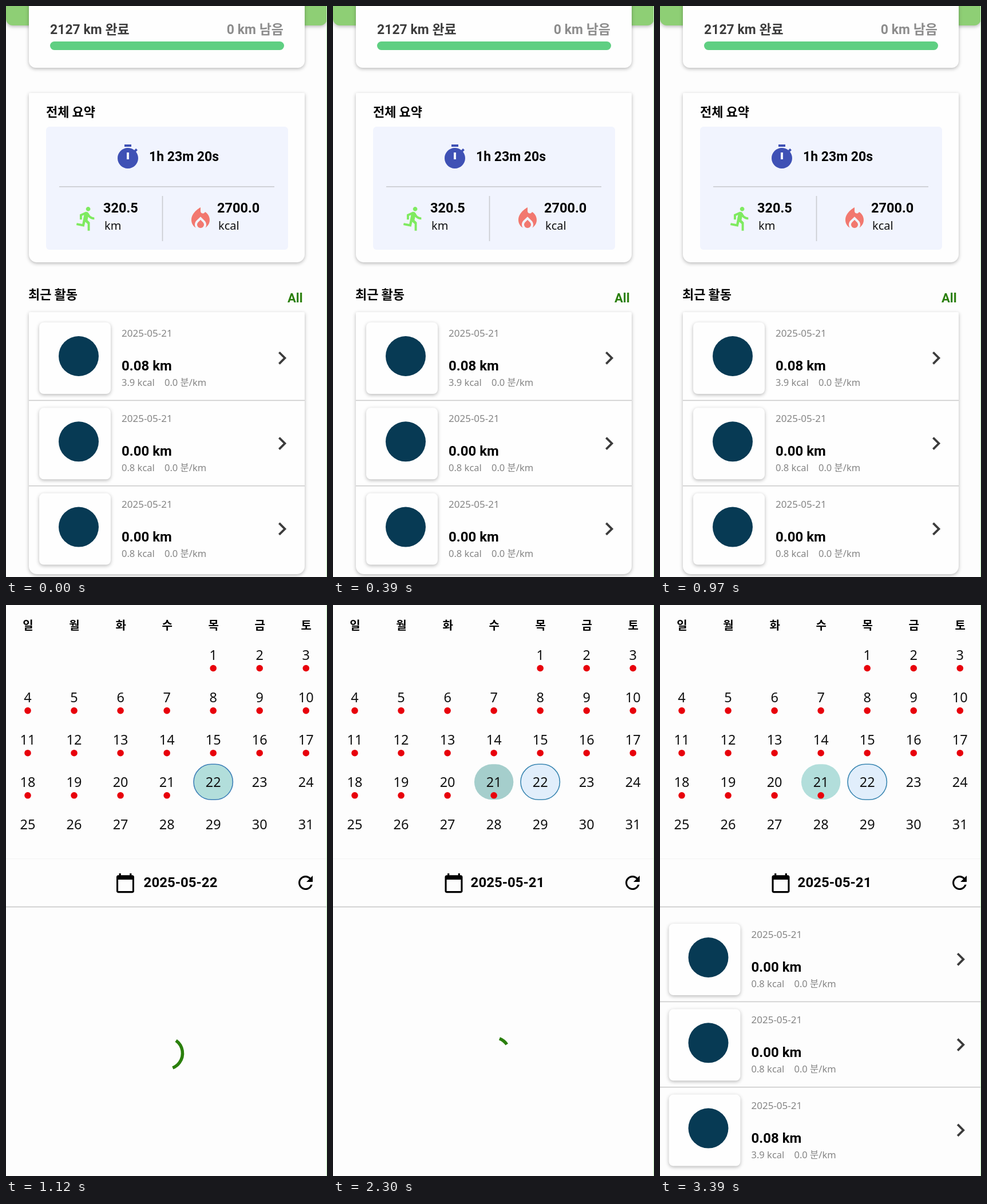
Recreate the animation shown at these times as an HTML page with a canvas. Size 561x998 px, loop 3420 ms.

```html
<!DOCTYPE html>
<html lang="ko">
<head>
<meta charset="utf-8">
<style>
html, body { margin: 0; width: 100%; height: 100%; overflow: hidden; background: #fdfdfd; }
canvas { display: block; }
</style>
</head>
<body>
<canvas id="stage" width="561" height="998"></canvas>
<script>
const ctx = document.getElementById('stage').getContext('2d');
const LOOP = 3420;
const BOLD = 'Roboto, "Noto Sans CJK KR", sans-serif';
const PLAIN = '"Noto Sans", "Noto Sans CJK KR", sans-serif';
const HANGUL = '"Noto Sans CJK KR", sans-serif';
const GREEN = '#2a7f0c';

// Times in ms
const OPEN_CALENDAR = 1000, EMPTY_SHOWN = 1480, DAY_TAPPED = 2170, LIST_SHOWN = 2600;

const icons = {
  timer: 'M15 1H9v2h6V1zm-4 13h2V8h-2v6zm8.03-6.61l1.42-1.42c-.43-.51-.9-.99-1.41-1.41l-1.42 1.42C16.07 4.74 14.12 4 12 4c-4.97 0-9 4.03-9 9s4.02 9 9 9 9-4.03 9-9c0-2.12-.74-4.07-1.97-5.61z',
  run: 'M13.49 5.48c1.1 0 2-.9 2-2s-.9-2-2-2-2 .9-2 2 .9 2 2 2zm-3.6 13.9l1-4.4 2.1 2v6h2v-7.5l-2.1-2 .6-3c1.3 1.5 3.3 2.5 5.5 2.5v-2c-1.9 0-3.5-1-4.3-2.4l-1-1.6c-.4-.6-1-1-1.7-1-.3 0-.5.1-.8.1l-5.2 2.2v4.7h2v-3.4l1.8-.7-1.6 8.1-4.9-1-.4 2 7 1.4z',
  fire: 'M12 12.9l-2.13 2.09C9.31 15.55 9 16.28 9 17.06 9 18.68 10.35 20 12 20s3-1.32 3-2.94c0-.78-.31-1.52-.87-2.07zM16 6l-.44.55C14.38 8.02 12 7.19 12 5.3V2S4 6 4 13c0 2.92 1.56 5.47 3.89 6.86-.56-.79-.89-1.76-.89-2.8 0-1.32.52-2.56 1.47-3.5L12 10.1l3.53 3.47c.95.93 1.47 2.17 1.47 3.5 0 1.02-.31 1.96-.85 2.75 1.89-1.15 3.29-3.06 3.71-5.3.66-3.55-1.07-6.9-3.86-8.52z',
  calendar: 'M20 3h-1V1h-2v2H7V1H5v2H4c-1.1 0-2 .9-2 2v16c0 1.1.9 2 2 2h16c1.1 0 2-.9 2-2V5c0-1.1-.9-2-2-2zm0 18H4V8h16v13z',
  refresh: 'M17.65 6.35C16.2 4.9 14.21 4 12 4c-4.42 0-7.99 3.58-7.99 8s3.57 8 7.99 8c3.73 0 6.84-2.55 7.73-6h-2.08c-.82 2.33-3.04 4-5.65 4-3.31 0-6-2.69-6-6s2.69-6 6-6c1.66 0 3.14.69 4.22 1.78L13 11h7V4l-2.35 2.35z',
  info: 'M12 2C6.48 2 2 6.48 2 12s4.48 10 10 10 10-4.48 10-10S17.52 2 12 2zm1 15h-2v-6h2v6zm0-8h-2V7h2v2z',
  chevron: 'M10 6L8.59 7.41 13.17 12l-4.58 4.59L10 18l6-6z'
};
for (const name in icons) icons[name] = new Path2D(icons[name]);

function icon(name, x, y, scale, color) {
  ctx.save();
  ctx.translate(x, y);
  ctx.scale(scale, scale);
  ctx.fillStyle = color;
  ctx.fill(icons[name], 'evenodd');
  ctx.restore();
}

function text(str, x, y, font, color = '#000', align = 'left') {
  ctx.font = font;
  ctx.fillStyle = color;
  ctx.textAlign = align;
  ctx.fillText(str, x, y);
}

function rect(x, y, w, h, color) {
  ctx.fillStyle = color;
  ctx.fillRect(x, y, w, h);
}

function rounded(x, y, w, h, radius, color) {
  ctx.beginPath();
  ctx.roundRect(x, y, w, h, radius);
  ctx.fillStyle = color;
  ctx.fill();
}

function disc(x, y, r, color) {
  ctx.beginPath();
  ctx.arc(x, y, r, 0, Math.PI * 2);
  ctx.fillStyle = color;
  ctx.fill();
}

function raised(x, y, w, h, radius, color = '#fefefe') {
  ctx.save();
  ctx.shadowColor = 'rgba(0,0,0,.28)';
  ctx.shadowBlur = 6;
  ctx.shadowOffsetY = 2;
  rounded(x, y, w, h, radius, color);
  ctx.restore();
}

function activity(thumbX, y, chevronX, km, kcal) {
  raised(thumbX, y, 125, 125, 8);
  disc(thumbX + 69, y + 59, 35, '#073a54');
  const x = thumbX + 144;
  text('2025-05-21', x, y + 25, '17px ' + PLAIN, '#858585');
  text(km + ' km', x, y + 84, 'bold 24px ' + BOLD);
  text(kcal + ' kcal', x, y + 111, '16.5px ' + PLAIN, '#858585');
  text('0.0 분/km', x + 75, y + 111, '16.5px ' + PLAIN, '#858585');
  icon('chevron', chevronX, y + 39.5, 1.9, '#3c3c3c');
}

function activityList(entries, thumbX, top, chevronX, lineX, lineW) {
  entries.forEach(([km, kcal], i) => {
    const y = top + i * 149.3;
    if (i) rect(lineX, y - 13.7, lineW, 1.6, '#cbcbcb');
    activity(thumbX, y, chevronX, km, kcal);
  });
}

function drawSummary() {
  raised(0, -30, 561, 64, 12, '#8ecf75');
  raised(40, -30, 482, 138, 12);
  text('2127 km 완료', 77, 49, 'bold 23px ' + BOLD, '#3c3c3c');
  text('0 km 남음', 485, 49, 'bold 23px ' + BOLD, '#8c8c8c', 'right');
  rounded(77, 62, 409, 15, 7.5, '#5fcf82');

  raised(40, 152, 482, 296, [2, 2, 14, 14]);
  text('전체 요약', 70, 193, 'bold 22px ' + HANGUL);
  rounded(70, 211, 423, 215, 6, '#f1f4fe');
  icon('timer', 189, 240, 2, '#3f51b5');
  text('1h 23m 20s', 250, 271, 'bold 23px ' + BOLD);
  rect(93, 315, 376, 1.6, '#c9cbd0');
  rect(272.7, 332, 1.6, 79, '#c9cbd0');
  icon('run', 117.3, 348, 1.95, '#7fea60');
  text('320.5', 170, 361, 'bold 23.5px ' + BOLD);
  text('km', 172, 391, '20px ' + PLAIN, '#111');
  icon('fire', 316, 348, 2, '#f2786f');
  text('2700.0', 369, 361, 'bold 23.5px ' + BOLD);
  text('kcal', 371, 391, '20px ' + PLAIN, '#111');

  text('최근 활동', 39, 512, 'bold 22px ' + HANGUL);
  text('All', 518.5, 518, 'bold 22px ' + BOLD, GREEN, 'right');
  raised(40, 535, 482, 458, [2, 2, 14, 14]);
  activityList([['0.08', '3.9'], ['0.00', '0.8'], ['0.00', '0.8']], 58, 553, 459.7, 40, 482);
}

const dayX = col => 38 + 81.05 * col;
const dayY = row => 87 + 74.1 * row;

function dayMark(col, fill, stroke) {
  rounded(dayX(col) - 34.2, dayY(3) - 31, 68.4, 62, 31, fill);
  if (!stroke) return;
  ctx.strokeStyle = stroke;
  ctx.lineWidth = 1.6;
  ctx.stroke();
}

function drawMonth(t) {
  if (t < DAY_TAPPED) {
    dayMark(4, '#b2dedb', '#3f80b8');
  } else {
    const press = Math.max(0, Math.min(1, (2500 - t) / 200));
    dayMark(3, '#b2dedb');
    dayMark(3, `rgba(0,0,0,${0.07 * press})`);
    dayMark(4, '#e1eefb', '#3b87b2');
  }
  [...'일월화수목금토'].forEach((name, col) =>
    text(name, dayX(col) + 0.5, 43, 'bold 20px ' + HANGUL, '#000', 'center'));
  for (let day = 1; day <= 31; day++) {
    const col = (day + 3) % 7, row = Math.floor((day + 3) / 7);
    text(day, dayX(col), dayY(row) + 9, '23.5px ' + PLAIN, '#111', 'center');
    if (day < 22) disc(dayX(col), dayY(row) + 23.5, 5.8, '#e8000b');
  }
}

// Cubic ease that fills the arc during the first half of its period
function arcGrowth(p) {
  if (p >= 0.5) return 1;
  let lo = 0, hi = 1;
  for (let i = 0; i < 20; i++) {
    const s = (lo + hi) / 2, r = 1 - s;
    if (0.6 * r * r * s + 0.3 * r * s * s + 0.5 * s ** 3 < p) lo = s; else hi = s;
  }
  return 3 * (1 - lo) * lo * lo + lo ** 3;
}

function spinner(ms) {
  const start = -Math.PI / 2 + ms / 4444 * Math.PI * 4;
  const sweep = 1.5 * Math.PI * arcGrowth(ms / 1333);
  ctx.beginPath();
  ctx.arc(281, 783.5, 27.5, start, start + sweep);
  ctx.strokeStyle = GREEN;
  ctx.lineWidth = 5.5;
  ctx.stroke();
}

function drawCalendar(t) {
  const tapped = t >= DAY_TAPPED;
  drawMonth(t);
  rect(0, 443, 561, 1, '#f3f3f3');
  icon('calendar', tapped ? 192.4 : 189.9, 467.5, 1.55, '#000');
  text(tapped ? '2025-05-21' : '2025-05-22', 305, 493, 'bold 24px ' + BOLD, '#000', 'center');
  icon('refresh', 504.8, 466.8, 1.56, '#000');
  rect(0, 526.7, 561, 1.8, '#cdcdcd');

  if (t < EMPTY_SHOWN) {
    spinner(t - 900);
  } else if (!tapped) {
    disc(179, 783, 12, '#e2f8da');
    icon('info', 161, 765, 1.5, '#3ac40f');
    text('활동 기록이 없습니다.', 202, 790, 'bold 22px ' + HANGUL);
  } else if (t < LIST_SHOWN) {
    spinner(t - DAY_TAPPED);
  } else {
    activityList([['0.00', '0.8'], ['0.00', '0.8'], ['0.08', '3.9']], 15.5, 557, 502.5, 0, 561);
  }
}

function frame() {
  const t = performance.now() % LOOP;
  rect(0, 0, 561, 998, '#fdfdfd');
  if (t < OPEN_CALENDAR) drawSummary(); else drawCalendar(t);
  rect(560, 0, 1, 998, '#c6f5c0');
  requestAnimationFrame(frame);
}
frame();
</script>
</body>
</html>
```
